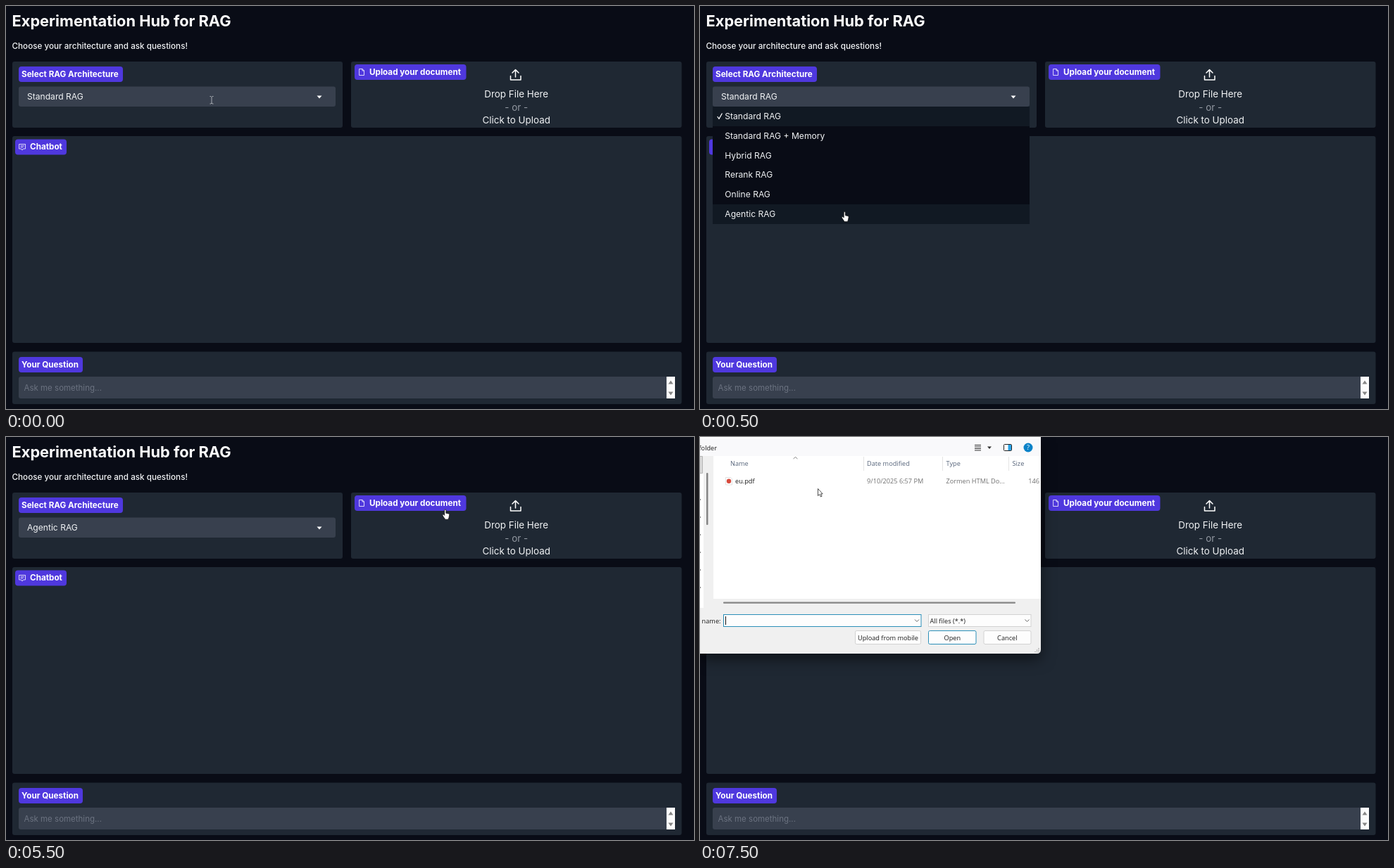
Recreate the animation shown at these times as an HTML page. Size 977 by 573 pixels, loop 8000 ms.

```html
<!DOCTYPE html>
<html lang="en">
<head>
<meta charset="utf-8">
<title>Experimentation Hub</title>
<style>
  html, body { margin: 0; width: 100%; height: 100%; overflow: hidden; background: #090c16; }
  svg { display: block; width: 977px; height: 573px; font: 12.1px Inter, sans-serif; }
  text { fill: #f1f3f5; white-space: pre; }
  .b { font-weight: 700; font-size: 11.7px; fill: #fff; }
  .drop { font-size: 13.4px; text-anchor: middle; }
  .panel { fill: #1f2833; }
  .field { fill: #38404e; }
  .pill { fill: #4f38de; }
  .line { fill: none; stroke: #fff; stroke-linecap: round; stroke-linejoin: round; }
  #dialog { filter: drop-shadow(0 8px 10px rgba(0, 0, 0, .5)); }
  #dialog text { font: 9.2px "Open Sans", "Noto Sans", sans-serif; fill: #1b1b1b; }
  #dialog .head { fill: #56647a; }
  #dialog .dim { fill: #707070; }
  #dialog .end { text-anchor: end; }
  #dialog .mid { text-anchor: middle; }
  .box { fill: #fdfdfd; stroke: #d2d2d2; }
  .focus { stroke: #2b8fb8; }
  .chev { fill: none; stroke: #666; }
</style>
</head>
<body>
<svg viewBox="0 0 977 573">
  <defs>
    <path id="hand" d="M3.2 8V1.7a1.1 1.1 0 0 1 2.2 0V5.8l3.6.7q1.3.3 1.2 1.7l-.7 3.8-1 2.7H4.2L.7 9.6Q-.1 8.2 1 7.6 2 7.2 3.2 8.9Z" fill="#fff" stroke="#111" stroke-width=".8" stroke-linejoin="round"/>
  </defs>
  <rect width="977" height="573" fill="#090c16"/>

  <text x="8.5" y="29" class="b" style="font-size:21.8px">Experimentation Hub for RAG</text>
  <text x="8.5" y="61" style="font-size:11.7px;font-weight:500">Choose your architecture and ask questions!</text>

  <g class="panel">
    <rect x="9" y="79" width="469" height="94" rx="3"/>
    <rect x="490" y="79" width="469.500" height="94" rx="3"/>
    <rect x="9" y="185" width="950.500" height="294" rx="3"/>
    <rect x="9" y="491.500" width="950.500" height="74.500" rx="3"/>
  </g>
  <g class="pill">
    <rect x="18" y="86" width="148" height="22" rx="4"/>
    <rect x="495" y="83" width="158.500" height="22" rx="4"/>
    <rect x="13" y="189.500" width="73" height="22" rx="4"/>
    <rect x="18" y="499" width="91" height="22" rx="4"/>
  </g>
  <g class="b">
    <text x="22" y="101" class="b">Select RAG Architecture</text>
    <text x="516" y="97.500" class="b">Upload your document</text>
    <text x="34" y="204" class="b">Chatbot</text>
    <text x="22" y="513.500" class="b">Your Question</text>
  </g>

  <rect class="field" x="18" y="114.500" width="450" height="28.500" rx="3"/>
  <text id="choice" x="30" y="132.800"></text>
  <path d="M441.500 127.500h7l-3.500 4z" fill="#fff"/>

  <path class="line" stroke-width=".8" d="M502 89.500h4l2.500 2.500v6.500h-6.500zM506 89.500v2.500h2.500"/>
  <path class="line" stroke-width=".8" d="M19 196.500h8.500v6.500h-3l-1.500 2-1.500-2H19zM21 198.800h4.500M21 200.800h3"/>
  <path class="line" stroke-width="1.500" d="M723.500 101V91M719 95l4.500-4.500L728 95M716.500 99.500v5.500h14.500v-5.500"/>
  <text class="drop" x="724.700" y="129.500">Drop File Here</text>
  <text class="drop" x="724.700" y="148.500" style="fill:#949aa3">- or -</text>
  <text class="drop" x="724.700" y="167">Click to Upload</text>

  <rect class="field" x="18" y="527" width="932" height="31" rx="3"/>
  <text x="25.500" y="546.500" style="font-size:11.5px;fill:#6b7280">Ask me something...</text>
  <rect x="938" y="527" width="12" height="31" fill="#fcfcfc"/>
  <path d="M940.500 537.500h7l-3.500-5zM940.500 548.500h7l-3.500 5z" fill="#858585"/>

  <g id="menu" data-from="500" data-to="5500">
    <rect x="18" y="143" width="450" height="167" fill="#090c16"/>
    <path d="M18 143h450v28H18zM18 282h450v28H18z" fill="#111923"/>
    <path class="line" stroke-width="1.300" d="M25 157.500l2 3 4.200-7.500"/>
  </g>

  <g id="dialog" data-from="7500" data-to="8000">
    <path d="M0 0h484v302q0 6-6 6H0z" fill="#f0f0f0"/>
    <path d="M0 0h484v27H0z" fill="#f9f9fb"/>
    <path d="M0 0h484v2H0z" fill="#fff"/>
    <path d="M19 27h465v203H19zM0 52h5v191H0z" fill="#fff"/>
    <path d="M-1 27.500H3.500v24H-1z" fill="#dadada" stroke="#b5b5b5"/>
    <rect x="9" y="51" width="2.500" height="74" rx="1" fill="#858585"/>
    <rect x="33" y="234.500" width="415" height="2.200" rx="1" fill="#858585"/>
    <path d="M232.500 28v20M344.500 28v20M438.500 28v20" stroke="#e4e4e4"/>
    <path class="chev" stroke-width=".8" d="M132.500 31l3-2.500 3 2.500"/>
    <g id="carets"></g>

    <text class="end" x="24" y="18.500">folder</text>
    <path d="M390 11.500h9M390 14h9M390 16.500h9M390 19h9" stroke="#333"/>
    <path d="M408 13.500h6l-3 3.500z" fill="#333"/>
    <rect x="431.500" y="10.500" width="11" height="9" rx="1" fill="#fff" stroke="#222"/>
    <path d="M437.500 11h4.500v8h-4.500z" fill="#2aa4e8"/>
    <circle cx="466" cy="15" r="6.500" fill="#0b82c8"/>
    <text class="mid" x="466" y="18.300" style="fill:#fff">?</text>

    <text class="head" x="43" y="41">Name</text>
    <text class="head" x="237" y="41">Date modified</text>
    <text class="head" x="349.500" y="41">Type</text>
    <text class="head" x="443.500" y="41">Size</text>
    <path d="M36.500 57.500h7l2 2v8.500h-9z" fill="#fff" stroke="#d5d5d5" stroke-width=".7"/>
    <circle cx="41" cy="62.800" r="3.200" fill="#d84a3c"/>
    <text x="50" y="66">eu.pdf</text>
    <text class="dim" x="237" y="66">9/10/2025 6:57 PM</text>
    <text class="dim" x="349.500" y="66">Zormen HTML Do...</text>
    <text class="dim end" x="482" y="66">146</text>

    <text class="end" x="29.500" y="264.500">File name:</text>
    <rect class="box focus" x="33.500" y="252.500" width="280.500" height="17"/>
    <path d="M36.500 255v12" stroke="#111"/>
    <rect class="box" x="324.500" y="252.500" width="145.500" height="17"/>
    <path class="chev" d="M305 259.500l3 3 3-3M461.500 259.500l3 3 3-3"/>
    <text x="326.500" y="264.500">All files (*.*)</text>
    <rect class="box" x="220.500" y="275.500" width="93" height="19" rx="2"/>
    <rect class="box focus" x="324.500" y="275.500" width="67.500" height="19" rx="2"/>
    <rect class="box" x="403" y="275.500" width="67" height="19" rx="2"/>
    <text class="mid" x="267" y="288.500">Upload from mobile</text>
    <text class="mid" x="358.300" y="288.500">Open</text>
    <text class="mid" x="436.300" y="288.500">Cancel</text>
    <path d="M481 300v6M478.500 302.500v3.500M476 305v1" stroke="#aaa" stroke-width="1.500" stroke-dasharray="1.500 1"/>
  </g>

  <path data-from="0" data-to="500" d="M289.500 128.500h1.500l1 1 1-1h1.500M292 129.500v8.500M289.500 139h1.500l1-1 1 1h1.500" fill="none" stroke="#c4c8cd" stroke-width=".8"/>
  <use href="#hand" x="201" y="292" data-from="500" data-to="5500"/>
  <use href="#hand" x="619.500" y="102.500" data-from="5500" data-to="7500"/>
  <path data-from="7500" data-to="8000" d="M167.500 73.500v10l2.300-2 1.600 3.500 1.700-.8-1.600-3.300h2.700z" fill="#fff" stroke="#222" stroke-width=".8"/>
</svg>
<script>
  const LOOP = 8000;
  const $ = id => document.getElementById(id);
  const add = (parent, tag, attrs, text = "") => {
    const el = document.createElementNS("http://www.w3.org/2000/svg", tag);
    for (const key in attrs) el.setAttribute(key, attrs[key]);
    el.textContent = text;
    parent.append(el);
  };

  ["Standard", "Standard RAG + Memory", "Hybrid", "Rerank", "Online", "Agentic"].forEach((name, i) =>
    add($("menu"), "text", { x: 35.3, y: 161 + 27.8 * i }, name.includes("RAG") ? name : name + " RAG"));

  for (let i = 0; i < 6; i++)
    add($("carets"), "path", { class: "chev", "stroke-width": 0.8, d: `M-1 ${87 + 25 * i}l2 2-2 2` });

  const timed = [...document.querySelectorAll("[data-from]")];
  function draw() {
    const t = performance.now() % LOOP;
    for (const el of timed)
      el.style.display = t >= +el.dataset.from && t < +el.dataset.to ? "" : "none";
    const label = t < 5500 ? "Standard RAG" : "Agentic RAG";
    if ($("choice").textContent !== label) $("choice").textContent = label;
    requestAnimationFrame(draw);
  }
  draw();
</script>
</body>
</html>
```
